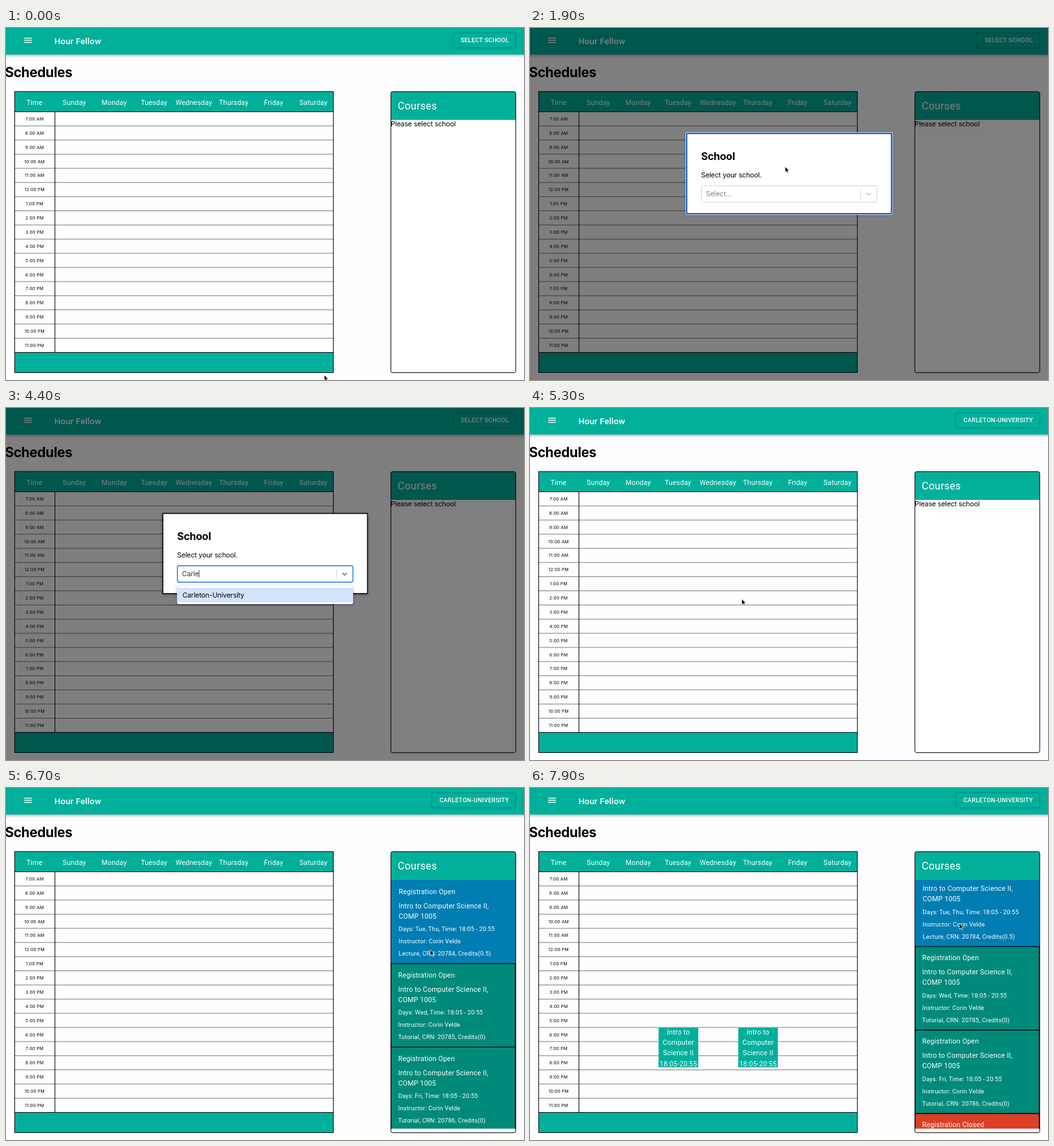
An HTML page for the animation above (8 s loop, 800 px wide and 544 px high).

```html
<!DOCTYPE html>
<html lang="en">
<head>
<meta charset="utf-8">
<title>Schedules</title>
<style>
html, body { margin: 0; width: 100%; height: 100%; overflow: hidden; background: #fefdff; }
svg { display: block; width: 100vw; height: 100vh; }
text { white-space: pre; }
.r { font-family: Roboto, sans-serif; font-size: 10.67px; letter-spacing: .0165em; fill: #fff; }
.i { font-family: Inter, sans-serif; font-size: 10.67px; letter-spacing: -.014em; fill: #000; }
.mid { text-anchor: middle; }
.end { text-anchor: end; }
.title { font-size: 13.33px; font-weight: 500; letter-spacing: .0075em; }
.btn { font-size: 9.33px; font-weight: 500; letter-spacing: .0286em; }
.h1 { font-size: 20.8px; font-weight: 700; letter-spacing: -.016em; }
.h2 { font-size: 16px; font-weight: 700; letter-spacing: -.016em; }
.h5 { font-size: 16px; }
.small { font-size: 9.33px; }
.hour { font-size: 6.67px; letter-spacing: .25px; }
.bar { filter: drop-shadow(0 1.5px 2.5px rgba(0,0,0,.42)); }
.drop { filter: drop-shadow(0 1px 2px rgba(0,0,0,.35)); }
.line { stroke: #000; fill: none; }
</style>
</head>
<body>
<svg id="stage" viewBox="0 0 800 544" preserveAspectRatio="none"></svg>
<script>
const TEAL = '#00b09b', GREEN = '#008a7a', BLUE = '#007db3', RED = '#db4026';
const LOOP = 8000, STEP = 100;
const CLICK = 1150, OPEN = 1350, FOCUS = 2500, TYPE = 3100, KEY = 250;
const PICK = 4900, LOAD = 6000, SCROLL = 6900, ADD = 7500;
const SCHOOL = 'Carleton-University';

const text = (cls, x, y, s, extra = '') => `<text class="${cls}" x="${x}" y="${y}" ${extra}>${s}</text>`;
const rect = (x, y, w, h, fill, extra = '') =>
  `<rect x="${x}" y="${y}" width="${w}" height="${h}" fill="${fill}" ${extra}/>`;
const path = (d, extra = '') => `<path d="${d}" ${extra}/>`;
const group = (id, body, extra = '') => `<g id="${id}" ${extra}>${body}</g>`;

function header() {
  const icon = [15, 18.33, 21.67].map(y => rect(28, y, 12, 1.33, '#fff')).join('');
  return rect(-12, -12, 824, 53, TEAL, 'class="bar"') + icon +
    text('r title', 74.7, 24.6, 'Hour Fellow') +
    rect(690.3, 7.3, 97, 23.6, 'none', 'id="button" rx="2.7" stroke="#000" stroke-opacity=".28" stroke-width=".8"') +
    '<clipPath id="buttonClip"><rect x="690" y="7" width="97.6" height="24" rx="2.7"/></clipPath>' +
    text('r btn end', 776.8, 22.4, '', 'id="label"') +
    '<circle id="ripple" cx="701" cy="18" fill="#fff" clip-path="url(#buttonClip)"/>';
}

function table() {
  const days = 'Time Sunday Monday Tuesday Wednesday Thursday Friday Saturday'.split(' ');
  const rowH = 21.875, top = 129.4;
  let s = rect(13.3, 98, 492.4, 31, TEAL) + rect(13.3, 501.4, 492.4, 31, TEAL);
  days.forEach((d, n) => s += text('r mid', 44 + 61.55 * n, 118.8, d));
  for (let n = 0; n < 17; n++) {
    const h = n + 7, y = top + rowH * n;
    if (n) s += path(`M13 ${y}H506`, 'class="line" stroke-opacity=".5"');
    s += text('i hour mid', 44.2, y + 13.5, `${(h + 11) % 12 + 1}:00 ${h < 12 ? 'AM' : 'PM'}`);
  }
  return s + path(`M13 ${top}H506M13 501.4H506M75.6 ${top}V501.4`, 'class="line"') +
    rect(13.4, 98.2, 492.2, 434.3, 'none', 'class="line"');
}

function lesson(x) {
  const lines = ['Intro to', 'Computer', 'Science II', '18:05-20:55'];
  return rect(x - 30.6, 370.4, 61.2, 61.2, TEAL) +
    lines.map((l, n) => text('r mid', x, 381 + 16.2 * n, l)).join('');
}

function card(n, days, kind, crn, credits, open = true) {
  const top = 143 + 129 * n;
  const rows = [
    ['', 20.8, 'Registration ' + (open ? 'Open' : 'Closed')],
    ['', 42.8, 'Intro to Computer Science II,'],
    ['', 58.8, 'COMP 1005'],
    ['small', 78.3, `Days: ${days}, Time: 18:05 - 20:55`],
    ['small', 97.3, 'Instructor: Corin Velde'],
    ['small', 116.3, `${kind}, CRN: ${crn}, Credits(${credits})`]
  ];
  const box = rect(594.7, top - .5, 191.8, 129, open ? GREEN : RED, 'stroke="#000" stroke-width="1.2"');
  const words = rows.map(([c, dy, s]) => text('r ' + c, 605.7, top + dy, s)).join('');
  return `<g class="card" data-fill="${open ? GREEN : RED}">${box}<g>${words}</g></g>`;
}

function panel() {
  return rect(594.3, 98, 193, 434.5, '#fff', 'rx="3"') +
    path('M594.3 142V101q0-3 3-3H784.3q3 0 3 3V142Z', `fill="${TEAL}"`) +
    text('r h5', 605, 126.4, 'Courses') +
    text('i', 594.3, 152, 'Please select school', 'id="hint"') +
    '<clipPath id="listClip"><rect x="594" y="142" width="193.4" height="384.4"/></clipPath>' +
    group('list', group('cards',
      card(0, 'Tue, Thu', 'Lecture', 20784, 0.5) + card(1, 'Wed', 'Tutorial', 20785, 0) +
      card(2, 'Fri', 'Tutorial', 20786, 0) + card(3, 'Tue', 'Tutorial', 20787, 0, false)),
      'clip-path="url(#listClip)"') +
    rect(594.4, 98.3, 192.8, 434.4, 'none', 'class="line" rx="3"');
}

function modal() {
  return rect(0, 0, 800, 544, '#000', 'opacity=".5"') +
    rect(242.3, 163, 316, 123.8, '#fff', 'class="drop" stroke="#000" stroke-width="1.4"') +
    group('ring',
      rect(240.8, 161.5, 319, 126.8, 'none', 'rx="2" stroke="#fff" stroke-width="1"') +
      rect(242, 162.7, 316.6, 124.4, 'none', 'rx="1.5" stroke="#1066d6" stroke-width="1.8"')) +
    text('i h2', 264.2, 203.7, 'School') + text('i', 264.2, 230.7, 'Select your school.') +
    rect(264.6, 243.8, 271.2, 25.4, '#fff', 'id="field" rx="2.7"') +
    path('M510.6 249V264', 'stroke="#ccc" stroke-width=".8"') +
    path('M519.6 255l3.4 3.4 3.4-3.4', 'id="chevron" fill="none" stroke-width="1.3"') +
    text('i', 271.8, 260.4, '', 'id="entry"') + path('M0 250.5V262', 'id="caret" stroke="#222" stroke-width=".8"') +
    group('menu', rect(264.4, 275, 271.6, 28, '#fff', 'class="drop" rx="2.7"') +
      rect(264.4, 277.8, 271.6, 22.6, '#d4e3fc') + text('i', 272.4, 293, SCHOOL));
}

function pointer() {
  const style = 'stroke-linejoin="round" stroke-width=".8"';
  return path('M0 0V9.2L2.1 7.3 3.5 10.5 5 9.8 3.6 6.8H6.5Z', `id="arrow" fill="#000" stroke="#fff" ${style}`) +
    path('M-1.2 6.5V.6Q-1.2-.7 0-.7T1.1.6V4Q2-.1 3 4.4 4-.2 4.6 4.7 6 3.7 6 5.5 6.2 8 4.6 11.4H-.6Q-1.3 9.4-3.4 7.3-3.8 5.5-1.2 6.9',
      `id="hand" fill="#fff" stroke="#000" ${style}`);
}

const stage = document.getElementById('stage');
stage.innerHTML = header() + text('i h1 end', 102.3, 75.8, 'Schedules') + table() +
  group('lessons', lesson(229.2) + lesson(352.2)) + panel() + group('modal', modal()) + group('cursor', pointer());

const $ = id => document.getElementById(id);
const set = (el, attrs) => Object.entries(attrs).forEach(([k, v]) => el.setAttribute(k, v));
const show = (id, on) => $(id).style.display = on ? '' : 'none';
const ramp = (t, a, b) => Math.min(1, Math.max(0, (t - a) / (b - a)));
const ease = p => p * p * (3 - 2 * p);

// time, x, y of the pointer
const track = [
  [0, 491.5, 536], [900, 704, 17], [1100, 701.5, 17], [1350, 701.5, 17], [1800, 394, 214], [1950, 394, 214],
  [2400, 340, 256], [4500, 340, 256], [4800, 327, 295], [5400, 327, 295], [6300, 655, 250],
  [7200, 655, 250], [7400, 663, 209], [LOOP, 663, 209]
];

function pointerAt(t) {
  const n = track.findIndex(k => k[0] > t);
  const [a, b] = [track[n - 1], track[n]];
  const p = ease(ramp(t, a[0], b[0]));
  return [a[1] + (b[1] - a[1]) * p, a[2] + (b[2] - a[2]) * p];
}

function draw(t) {
  const [x, y] = pointerAt(t);
  const picked = t >= PICK, focused = t >= FOCUS;

  const left = picked ? 657.3 : 690.3;
  const hover = x > left && x < 787 && y > 7 && y < 31;
  $('label').textContent = (picked ? SCHOOL : 'Select school').toUpperCase();
  set($('button'), { x: left, width: 787.3 - left, fill: hover ? 'rgba(0,0,0,.05)' : 'none' });
  set($('ripple'), { r: 80 * ramp(t, CLICK - 10, CLICK + 540), opacity: .3 * (1 - ramp(t, CLICK + 150, CLICK + 600)) });

  const fade = ramp(t, OPEN, OPEN + 225) * (1 - ramp(t, PICK, PICK + 200));
  show('modal', fade > 0);
  set($('modal'), { opacity: fade });
  show('ring', !focused);
  set($('field'), { stroke: focused ? '#2080d8' : '#ccc', 'stroke-width': focused ? 1.4 : .9 });
  set($('chevron'), { stroke: focused ? '#555' : '#bbb' });
  const count = t < TYPE ? 0 : Math.min(5, 1 + Math.floor((t - TYPE) / KEY));
  const entry = $('entry');
  entry.textContent = count ? SCHOOL.slice(0, count) : 'Select...';
  entry.style.fill = count ? '#333' : '#808080';
  const last = count ? TYPE + (count - 1) * KEY : FOCUS;
  show('caret', focused && (t - last) % 1000 < 500);
  const caretX = 272.2 + (count && fade ? entry.getComputedTextLength() : 0);
  set($('caret'), { transform: `translate(${caretX})` });
  show('menu', focused && !picked);

  const scroll = 26.3 * ease(ramp(t, SCROLL, SCROLL + 300));
  show('hint', t < LOAD);
  show('list', t >= LOAD);
  set($('cards'), { transform: `translate(0 ${-scroll})` });
  document.querySelectorAll('.card').forEach((c, n) => {
    const top = 143 + 129 * n - scroll;
    const over = x > 594 && x < 787 && y > top && y < top + 129;
    set(c.firstChild, { fill: over ? BLUE : c.dataset.fill, stroke: over ? BLUE : '#000' });
    set(c.lastChild, { transform: `translate(${over ? .8 : 0})` });
  });
  show('lessons', t >= ADD);

  show('cursor', t < TYPE || t >= 4500);
  set($('cursor'), { transform: `translate(${x} ${y})` });
  const hand = hover && fade === 0;
  show('hand', hand);
  show('arrow', !hand);
}

const start = performance.now();
function tick() {
  const t = (performance.now() - start) % LOOP;
  draw(Math.floor(t / STEP) * STEP);
  requestAnimationFrame(tick);
}
tick();
</script>
</body>
</html>
```
